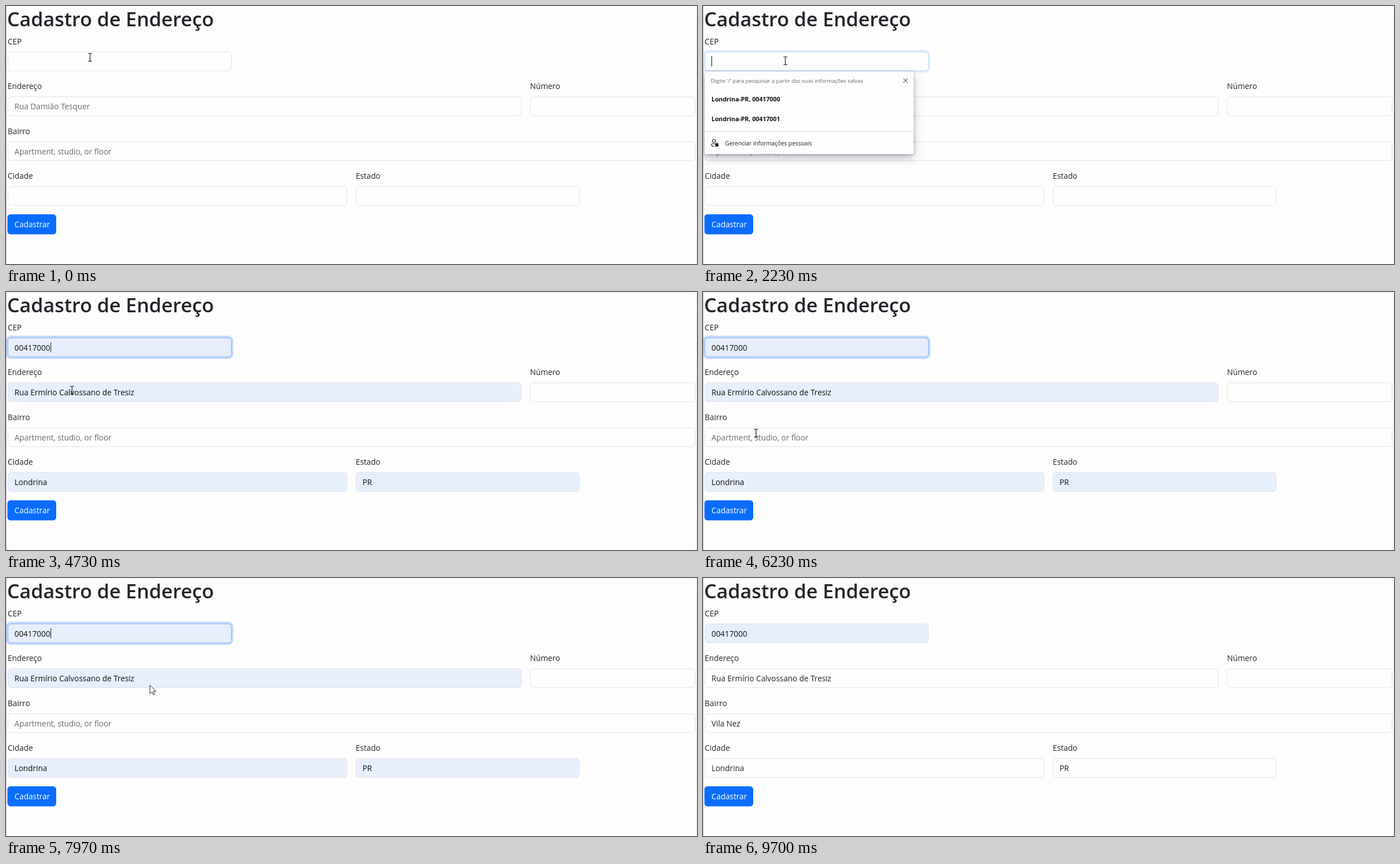
Write an HTML page that moves like this. It is 1225 px wide and 457 px high and loops after 9730 ms.

```html
<!DOCTYPE html>
<html lang="pt">
<head>
<meta charset="utf-8">
<title>Cadastro de Endereço</title>
<style>
  html, body { margin: 0; width: 100%; height: 100%; overflow: hidden; background: #fdfdfd; }
  svg { display: block; width: 100%; height: 100%; font: 13.85px "Open Sans", "Noto Sans", sans-serif; fill: #212529; }
  .popup { filter: drop-shadow(0 1px 2px rgba(20, 20, 50, .3)) drop-shadow(0 7px 8px rgba(20, 20, 60, .25)); }
</style>
</head>
<body>
<svg id="stage" viewBox="0 0 1225 457"></svg>
<script>
const LOOP = 9730;
const FOCUS = 2170, PICK = 4550, BLUR = 9050, LOADED = 9300;
const CODE = "00417000", OTHER_CODE = "00417001";
const STREET = "Rua Ermírio Calvossano de Tresiz";

// time, x, y
const PATH = [
  [0, 149, 91], [2200, 146, 97], [2700, 146, 97], [3500, 115, 174],
  [4750, 117, 174], [5300, 117, 174], [6000, 94, 250], [6700, 94, 250],
  [7450, 205, 409], [7970, 255, 190], [8500, 330, -30], [LOOP, 330, -30]
];

const FIELDS = [
  { label: "CEP", x: 3, y: 81, w: 397, value: CODE, auto: true },
  { label: "Endereço", x: 3, y: 160.5, w: 911, value: STREET, hint: "Rua Damião Tesquer", auto: true },
  { label: "Número", x: 929, y: 160.5, w: 293 },
  { label: "Bairro", x: 3, y: 240, w: 1219, late: "Vila Nez", hint: "Apartment, studio, or floor" },
  { label: "Cidade", x: 3, y: 319.5, w: 602, value: "Londrina", auto: true },
  { label: "Estado", x: 620, y: 319.5, w: 397, value: "PR", auto: true }
];
const HEIGHT = 34.5;

const clamp = v => Math.max(0, Math.min(1, v));

const text = (x, y, s, attrs = "") => `<text x="${x}" y="${y}" ${attrs}>${s}</text>`;

const box = (x, y, w, h, r, attrs) =>
  `<rect x="${x}" y="${y}" width="${w}" height="${h}" rx="${r}" ${attrs}/>`;

const line = (d, color, width = 1) =>
  `<path d="${d}" fill="none" stroke="${color}" stroke-width="${width}"/>`;

function pointer(t) {
  const i = Math.max(1, PATH.findIndex(p => p[0] > t));
  const [t0, x0, y0] = PATH[i - 1], [t1, x1, y1] = PATH[i];
  const k = clamp((t - t0) / (t1 - t0));
  return { x: x0 + (x1 - x0) * k, y: y0 + (y1 - y0) * k };
}

const popupOpen = t => t >= FOCUS && t < PICK;

function overField(t) {
  const { x, y } = pointer(t);
  if (popupOpen(t) && x < 373 && y > 116 && y < 262) return false;
  return FIELDS.some(f => x > f.x && x < f.x + f.w && y > f.y && y < f.y + HEIGHT);
}

function field(f, t, filled, glow) {
  const loaded = t >= LOADED;
  const value = loaded && f.late || filled && f.value;
  const tinted = filled && f.auto && !(loaded && f.label !== "CEP");
  const base = f.y + 22.5;
  let out = text(f.x, f.y - 13.5, f.label);
  if (glow) out += box(f.x - 1.5, f.y - 1.5, f.w + 2.5, HEIGHT + 2.5, 7,
    `fill="none" stroke="#0d6efd" stroke-width="4" opacity="${glow * .25}"`);
  out += box(f.x + .5, f.y + .3, f.w - 1, HEIGHT - 1, 5.5,
    `fill="${tinted ? "#e7effc" : "#fdfdfd"}" stroke="#dee2e6"`);
  if (glow) out += box(f.x + .5, f.y + .3, f.w - 1, HEIGHT - 1, 5.5,
    `fill="none" stroke="#86b7fe" opacity="${glow}"`);
  if (value) out += text(f.x + 12, base, value, tinted ? 'fill="#111"' : "");
  else if (f.hint) out += text(f.x + 12, base, f.hint, 'fill="#686b6e"');
  return out;
}

function popup(hover) {
  const bold = 'font-size="10.85" font-weight="700" fill="#111"';
  return box(3, 116, 370.5, 146.5, 3, 'fill="#fdfdfd" class="popup"')
    + text(14, 136, "Digite '/' para pesquisar a partir das suas informações salvas", 'font-size="9.6" fill="#686868"')
    + line("M355 128l8 8m0-8l-8 8", "#333")
    + (hover ? box(6.5, 148.5, 362, 34, 1.5, 'fill="#e0eefa" stroke="#5f9fcf"') : "")
    + text(15, 169, "Londrina-PR, " + CODE, bold)
    + text(15, 204, "Londrina-PR, " + OTHER_CODE, bold)
    + line("M3 222.5H373", "#d9d9d9")
    + '<circle cx="19.5" cy="239" r="2.8" fill="none" stroke="#222" stroke-width="1.1"/>'
    + line("M21 244H16.5Q14.7 244 14.8 246Q15.5 248.7 20 248.7", "#222", 1.1)
    + box(21.5, 243.5, 6, 5.5, 1, 'fill="#222"')
    + line("M23 244v-1.2q1.5-1.8 3 0v1.2", "#222", .9)
    + text(39, 247, "Gerenciar informações pessoais", 'font-size="10.35" fill="#222"');
}

function cursor(t) {
  const { x, y } = pointer(t);
  // The pointer shape lags slightly behind its position.
  const shape = overField(Math.max(0, t - 60))
    ? line("M-3.5-7H-1L0-6.3L1-7H3.5M0-6.3V6.3M-3.5 7H-1L0 6.3L1 7H3.5", "#111", 1.2)
    : '<path d="M0 0V15.5L3.7 12L6.2 17.5L8.5 16.5L6.1 11.2H11Z" fill="#fff" stroke="#222"/>';
  return `<g transform="translate(${x.toFixed(1)} ${y.toFixed(1)})">${shape}</g>`;
}

function scene(t) {
  const open = popupOpen(t), { y } = pointer(t);
  const hover = open && y > 148 && y < 183;
  const filled = hover || t >= PICK;
  const glow = clamp((t - FOCUS) / 150) * clamp(1 - (t - BLUR) / 150);
  const blinkStart = t < PICK ? FOCUS : PICK;
  const caret = t >= FOCUS && t < BLUR && !hover && (t - blinkStart) % 1000 < 500;
  const caretX = t < PICK ? 15.5 : 79.5;

  return box(0, 0, 1225, 457, 0, 'fill="#fdfdfd"')
    + line("M0 .5H1214Q1223.5 1 1223.5 10V457", "#efeff3")
    + line("M.5 0V457", "#d6bfc9")
    + text(2, 36, "Cadastro de Endereço", 'font-size="34.85" font-weight="600"')
    + FIELDS.map((f, i) => field(f, t, filled, i ? 0 : glow)).join("")
    + box(2.5, 369, 86.5, 35.5, 5.5, 'fill="#0a6dfe"')
    + text(15, 392, "Cadastrar", 'fill="#fff"')
    + (caret ? line(`M${caretX} 89V107`, "#111") : "")
    + (open ? popup(hover) : "")
    + cursor(t);
}

const stage = document.getElementById("stage");
const start = performance.now();
function tick() {
  stage.innerHTML = scene((performance.now() - start) % LOOP);
  requestAnimationFrame(tick);
}
tick();
</script>
</body>
</html>
```
